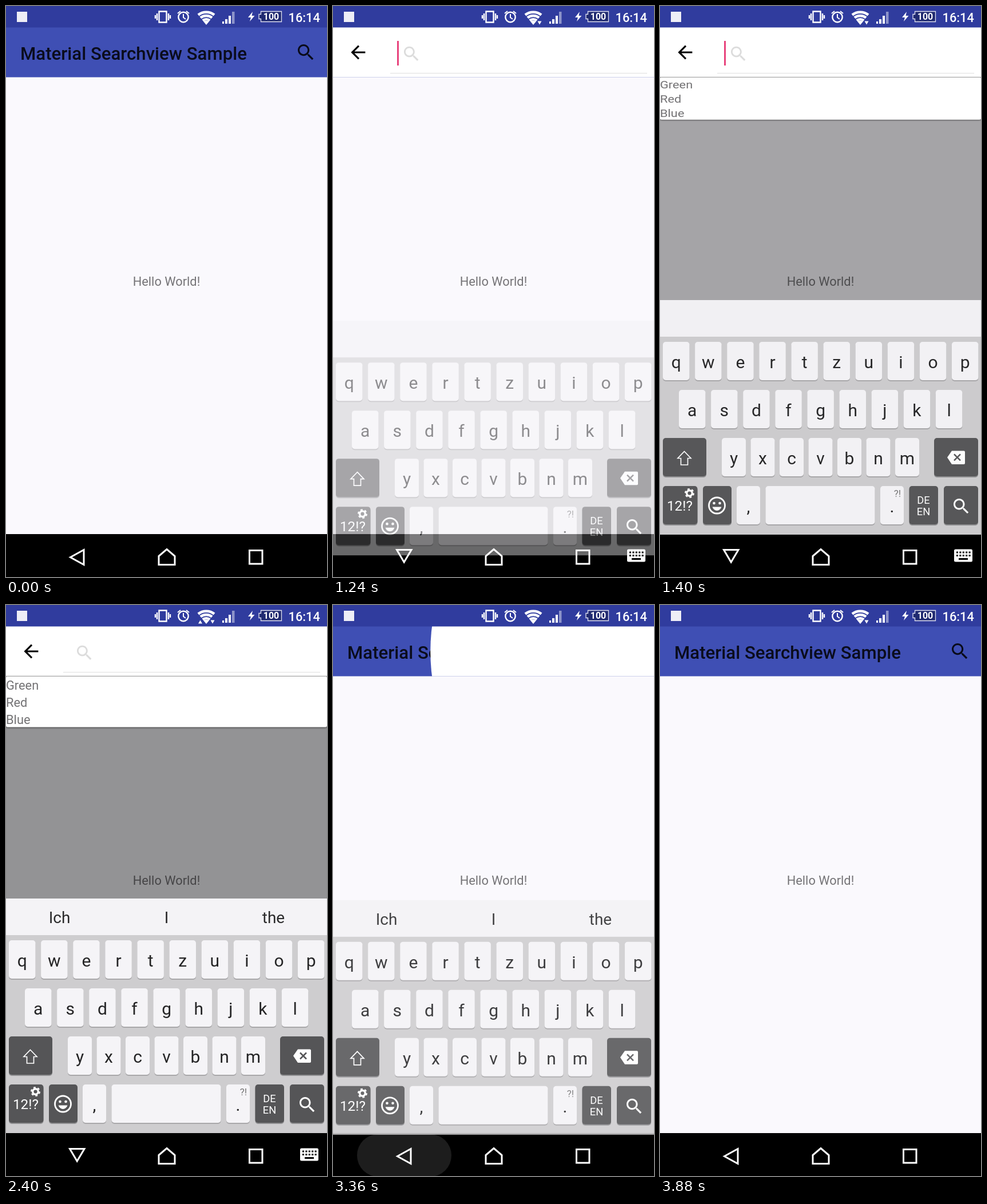
An HTML page for the animation above (3920 ms loop, 561 by 998 pixels).

```html
<!DOCTYPE html>
<html lang="en">
<head>
<meta charset="utf-8">
<title>Search view</title>
<style>
  html, body { margin: 0; width: 100%; height: 100%; overflow: hidden; background: #000; }
  svg { display: block; width: 561px; height: 998px; font-family: Roboto, sans-serif; }
  .mid { text-anchor: middle; }
  .line { fill: none; stroke: #fff; }
</style>
</head>
<body>
<svg viewBox="0 0 561 998">
  <defs>
    <path id="lens" d="M15.5 14h-.79l-.28-.27C15.41 12.59 16 11.11 16 9.5 16 5.91 13.09 3 9.5 3S3 5.91 3 9.5 5.91 16 9.5 16c1.61 0 3.09-.59 4.23-1.57l.27.28v.79l5 4.99L20.49 19l-4.99-5zm-6 0C7.01 14 5 11.99 5 9.5S7.01 5 9.5 5 14 7.01 14 9.5 11.99 14 9.5 14z"/>
    <clipPath id="reveal"><circle id="revealCircle" cx="523" cy="81"/></clipPath>
  </defs>

  <!-- App content -->
  <rect width="561" height="923" fill="#faf9fd"/>
  <text class="mid" x="280.5" y="489" font-size="21.8" fill="#757477">Hello World!</text>
  <rect id="dim" y="124" width="561" height="799"/>

  <!-- Toolbar -->
  <rect y="37" width="561" height="87.5" fill="#3f4fb4"/>
  <text x="25" y="94" font-size="31.2" font-weight="500" fill="#0a0c1c">Material Searchview Sample</text>
  <use href="#lens" transform="translate(505.3 62.3) scale(1.56)" fill="#090b1a"/>

  <!-- Search bar -->
  <rect y="37" width="561" height="87.5" fill="#fff" clip-path="url(#reveal)"/>
  <g id="searchContent">
    <path transform="translate(25.2 62.3) scale(1.56)" d="M20 11H7.83l5.59-5.59L12 4l-8 8 8 8 1.41-1.41L7.83 13H20z"/>
    <use href="#lens" transform="translate(119.6 66.3) scale(1.45)" fill="#dcdcdc"/>
    <path d="M100 117.5H549" stroke="#dedede"/>
    <rect id="cursor" x="112" y="61" width="3" height="43" fill="#e8437c"/>
  </g>

  <!-- Suggestion list -->
  <g id="list" fill="#737274" font-size="21.8">
    <rect y="124.5" width="561" height="89" rx="3" fill="#fff" style="filter:drop-shadow(0 1px 1.5px #0009)"/>
    <text y="148">Green</text>
    <text y="178">Red</text>
    <text y="207.5">Blue</text>
  </g>
  <path id="listEdge" d="M0 124.5H561" stroke="#a0a0a0"/>

  <!-- Status bar -->
  <rect width="561" height="37.5" fill="#303c9e"/>
  <g fill="#fff">
    <rect x="19" y="10" width="18" height="18" fill="#eeeef6"/>
    <g class="line" stroke-width="2.4">
      <path d="M267.5 9.5H280.5V28.5H267.5Z M264 13V25 M284 13V25 M261 16V22 M287 16V22"/>
      <circle cx="310" cy="19.5" r="8.7"/>
      <path d="M310 14V20L314 23 M300 13L305 9 M320 13L315 9" stroke-width="2"/>
    </g>
    <g id="wifi" class="line" stroke-width="4.6"></g>
    <path d="M350 33L345 27Q350 24 355 27Z"/>
    <path id="wifiDown" d="M357.5 26.5H364.5L361 32.5Z"/>
    <path id="wifiUp" d="M336 32.5H343L339.5 26.5Z"/>
    <path d="M378 31V27H381V31Z M383 31V23H387V31Z M389 31V17H393V31Z"/>
    <path d="M395 31V10H399.500V31Z" opacity=".45"/>
    <path d="M431 10L423 20H428L426 27L434.500 17H429.500Z"/>
    <path d="M445.500 9.500H481.500V27.500H445.500V22.500H442V14.500H445.500Z" fill="#202a70" stroke="#dfe0f0" stroke-width="1.3"/>
    <text class="mid" x="463.5" y="24" font-size="16" font-weight="700">100</text>
    <text x="493.5" y="27.500" font-size="21.8" font-weight="500">16:14</text>
  </g>

  <!-- Navigation bar and keyboard -->
  <rect y="923" width="561" height="75"/>
  <g id="keyboard">
    <rect y="513" width="561" height="64" fill="#f4f3f6"/>
    <rect y="577" width="561" height="346" fill="#cecdcf"/>
    <g id="words" class="mid" font-size="28" fill="#2b2b2c">
      <text x="93.5" y="556">Ich</text><text x="280.5" y="556">I</text><text x="467.5" y="556">the</text>
    </g>
    <g id="keys"></g>
    <path class="line" stroke-width="1.7" d="M42.500 777.500L54 789.500H48.500V801H36.500V789.500H31Z"/>
    <path fill="#fff" d="M502 788L510 776.500H531Q533 776.500 533 778.500V798Q533 800 531 800H510Z"/>
    <path d="M514 782.500L525 793.500M525 782.500L514 793.500" stroke="#555557" stroke-width="2.5"/>
    <g fill="#fff">
      <circle class="line" cx="51.500" cy="850.500" r="4.800" stroke-width="3.400"/>
      <circle class="line" cx="51.500" cy="850.500" r="7.200" stroke-width="2.600" stroke-dasharray="3.770 3.770"/>
      <circle class="line" cx="99.500" cy="872" r="14" stroke-width="2.800"/>
      <circle cx="94.500" cy="868" r="2.300"/><circle cx="104.500" cy="868" r="2.300"/>
      <path d="M91.500 874.500H107.500Q105 881 99.500 881T91.500 874.500Z"/>
      <use href="#lens" transform="translate(508.500 855.400) scale(1.5)"/>
      <g class="mid">
        <text x="34.500" y="881" font-size="24.300">12!?</text>
        <text x="460.500" y="869" font-size="18.300">DE</text>
        <text x="460.500" y="889" font-size="18.300">EN</text>
        <text x="415" y="857" font-size="17" fill="#777">?!</text>
      </g>
    </g>
  </g>
  <rect id="ripple" y="925" height="74" rx="37" fill="#fff"/>
  <g class="line" stroke-width="3">
    <path id="back" d="M112.500 963.500L136 950.500V976.500Z"/>
    <path id="down" d="M111.500 950.500H137L124.200 972Z"/>
    <path d="M267 961.500L281 949.500L295 961.500V976.500H267Z"/>
    <path d="M425.500 951.500H448V975H425.500Z"/>
  </g>
  <g id="switcher">
    <rect x="514" y="949.500" width="32" height="22" rx="2.500" fill="#fff"/>
    <path d="M518 955H543M518 960.500H543" stroke="#000" stroke-width="3" stroke-dasharray="3 2.400"/>
    <path d="M522 966.500H538" stroke="#000" stroke-width="3"/>
  </g>
</svg>
<script>
const LOOP = 3920, STEP = 40;
const $ = id => document.getElementById(id);
const progress = (t, start, length) => Math.min(1, Math.max(0, (t - start) / length));
const easeInOut = x => (1 - Math.cos(Math.PI * x)) / 2;
const show = (id, on) => $(id).setAttribute('visibility', on ? 'visible' : 'hidden');
const set = (id, attributes) => {
  for (const name in attributes) $(id).setAttribute(name, attributes[name]);
};

// cubic-bezier(.4, 0, .2, 1), solved by bisection
function fastOutSlowIn(x) {
  let low = 0, high = 1;
  for (let i = 0; i < 20; i++) {
    const s = (low + high) / 2, r = 1 - s;
    if (1.2 * r * r * s + .6 * r * s * s + s ** 3 < x) low = s; else high = s;
  }
  return low * low * (3 - 2 * low);
}

function key(x, y, width, label = '', dark = false) {
  const box = (dy, fill) =>
    `<rect x="${x}" y="${y + dy}" width="${width}" height="67" rx="5" fill="${fill}"/>`;
  return box(2, dark ? '#8f8f91' : '#a9a8aa') + box(0, dark ? '#555557' : '#f5f4f7') +
    `<text class="mid" x="${x + width / 2}" y="${y + 46}" font-size="30" fill="#242425">${label}</text>`;
}
const row = (letters, x, y, width, pitch) =>
  [...letters].map((letter, i) => key(x + i * pitch, y, width, letter)).join('');

$('keys').innerHTML =
  row('qwertzuiop', 5, 586, 46.5, 56.1) +
  row('asdfghjkl', 33, 670, 46.5, 56.1) +
  row('yxcvbnm', 108, 754, 42, 50.5) +
  key(5, 754, 76, '', true) + key(479, 754, 77, '', true) +
  key(134, 838, 41, ',') + key(184.5, 838, 191) + key(385, 838, 41, '.') +
  [[5, 60.5], [75, 50], [435.5, 50.5], [496, 60]].map(([x, w]) => key(x, 838, w, '', true)).join('');

$('wifi').innerHTML = [22.3, 16, 9.8].map(r => {
  const dx = r * Math.sin(.68), y = 33 - r * Math.cos(.68);
  return `<path d="M${350 - dx} ${y}A${r} ${r} 0 0 1 ${350 + dx} ${y}"/>`;
}).join('');

function draw(t) {
  const opening = easeInOut(progress(t, 940, 310));
  const closing = easeInOut(progress(t, 3243, 300));
  set('revealCircle', { r: 527 * (opening - closing) });
  show('searchContent', t >= 1240 && t < 3240);
  show('cursor', t >= 1240 && t < 3240 && (t < 1440 || t >= 1920 && t < 2400 || t >= 2920));

  const unfold = fastOutSlowIn(progress(t, 1258, 257)) - fastOutSlowIn(progress(t, 3180, 160));
  set('dim', { opacity: .41 * unfold });
  set('list', { transform: `translate(0 ${124 * (1 - unfold)}) scale(1 ${unfold})` });
  show('list', unfold > .005);
  show('listEdge', unfold > .005);

  const rest = 1 - progress(t, 1180, 370), leave = progress(t, 3210, 300);
  set('keyboard', {
    transform: `translate(0 ${90 * (rest ** 5 + leave ** 5)})`,
    opacity: 1 - rest ** 4 - leave ** 3
  });
  show('words', t >= 1560);

  const keyboardUp = t >= 1200 && t < 3280;
  show('down', keyboardUp);
  show('switcher', keyboardUp);
  show('back', !keyboardUp);

  const grow = 1 - (1 - progress(t, 3130, 220)) ** 2;
  set('ripple', {
    x: 124.5 - 82.5 * grow, width: 165 * grow,
    opacity: .19 * (1 - progress(t, 3200, 400))
  });

  show('wifiDown', t >= 840 && t < 2800 || t >= 3760);
  show('wifiUp', t >= 1800 && t < 2800);
}

function tick() {
  const t = performance.now() % LOOP;
  draw(Math.floor(t / STEP) * STEP);
  requestAnimationFrame(tick);
}
tick();
</script>
</body>
</html>
```
